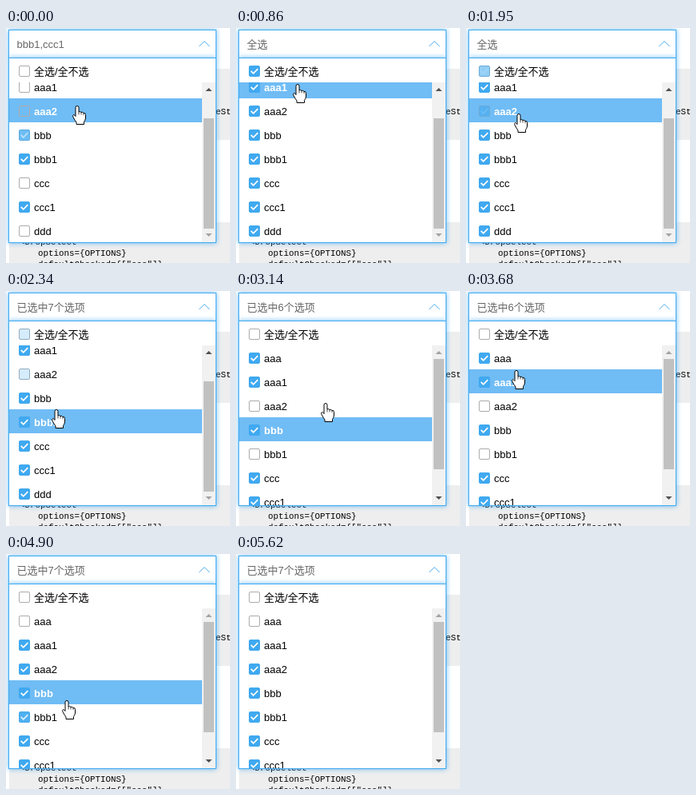
Animation of 280 by 294 pixels, one loop 5.89 s. Source, as an HTML page with a canvas:

```html
<!DOCTYPE html>
<html lang="zh-CN">
<head>
<meta charset="utf-8">
<title>Multi-select dropdown</title>
<style>
html, body { margin: 0; width: 100%; height: 100%; overflow: hidden; background: #fff; }
canvas { display: block; }
</style>
</head>
<body>
<canvas id="stage" width="280" height="294"></canvas>
<script>
const ctx = document.getElementById('stage').getContext('2d', { alpha: false });
const LOOP = 5890, BEAT = 134, LEAD = 78, FADE = 300;
const ROW = 30, LIST_TOP = 68, LIST_BOTTOM = 268, MAX_SCROLL = 40;
const BLUE = '#40a9f0', HOVER = '#70bcf5';
const SANS = '13px "Liberation Sans", "Noto Sans CJK SC", "Noto Sans CJK", sans-serif';
const MONO = '10.83px "Liberation Mono", monospace';
const ITEMS = ['aaa', 'aaa1', 'aaa2', 'bbb', 'bbb1', 'ccc', 'ccc1', 'ddd'];
const ALL = 'all';

// The pointer rests at each stop and glides between them; a click comes just before leaving.
const stop = (arrive, leave, x, y, click = false) => ({ arrive, leave, x, y, click });
const stops = [
  stop(0, 20, 89, 97),
  stop(380, 520, 78, 56, true),
  stop(590, 870, 77, 70),
  stop(990, 1300, 74, 93, true),
  stop(1530, 1830, 60, 56, true),
  stop(1930, 2170, 66, 107, true),
  stop(2330, 2510, 63, 148, true),
  stop(2860, 3390, 112, 140),
  stop(3800, 4020, 49, 87, true),
  stop(4205, 4400, 66, 141, true),
  stop(4480, 4675, 63, 193, true),
  stop(4880, 4890, 76, 183),
  stop(5140, 5150, 268, 278),
  stop(5540, LOOP, 290, 310)
];

const smooth = p => p * p * (3 - 2 * p);
const clamp = p => Math.min(1, Math.max(0, p));
const scrollAt = t => MAX_SCROLL * (1 - smooth(clamp((t - 2940) / 180)));

// While the pointer rests, the hovered row stays the one it arrived on.
function pointerAt(t) {
  const i = stops.findLastIndex(s => s.arrive <= t);
  const from = stops[i], to = stops[i + 1] || from;
  const p = t < from.leave ? 0 : smooth(clamp((t - from.leave) / (to.arrive - from.leave)));
  const x = from.x + (to.x - from.x) * p;
  const y = from.y + (to.y - from.y) * p;
  return { x, y, hover: rowUnder(x, y, scrollAt(p ? t : from.arrive)) };
}

function rowUnder(x, y, scroll) {
  if (x > 262 || y >= LIST_BOTTOM) return null;
  return y < LIST_TOP ? ALL : ITEMS[Math.floor((y - LIST_TOP + scroll) / ROW)];
}

const clicks = stops.filter(s => s.click).map(({ leave }) => {
  const time = leave - 70;
  return { time, name: pointerAt(time).hover };
});

function selectionAt(t) {
  const state = {};
  for (const name of [ALL, ...ITEMS])
    state[name] = { on: name === 'bbb1' || name === 'ccc1', since: -LOOP };
  state.bbb.since = -70;
  const set = (name, on, since) => {
    if (state[name].on !== on) state[name] = { on, since };
  };
  for (const { time, name } of clicks) {
    if (time > t) break;
    if (name === ALL) ITEMS.forEach(item => set(item, true, time));
    else set(name, !state[name].on, time);
    set(ALL, ITEMS.every(item => state[item].on), time);
  }
  for (const s of Object.values(state)) {
    const p = clamp((t - s.since) / FADE);
    s.level = s.on ? p : 1 - p;
  }
  return state;
}

function rect(x, y, w, h, color) {
  ctx.fillStyle = color;
  ctx.fillRect(x, y, w, h);
}

function text(str, x, y, color, font = SANS) {
  ctx.font = font;
  ctx.fillStyle = color;
  ctx.fillText(str, x, y);
}

function line(points, color, width) {
  ctx.beginPath();
  points.forEach(([x, y]) => ctx.lineTo(x, y));
  ctx.strokeStyle = color;
  ctx.lineWidth = width;
  ctx.stroke();
}

function triangle(x, y, dir, color) {
  ctx.beginPath();
  ctx.moveTo(x - 4, y + 2 * dir);
  ctx.lineTo(x + 4, y + 2 * dir);
  ctx.lineTo(x, y - 2 * dir);
  ctx.fillStyle = color;
  ctx.fill();
}

function glowBox(y, h) {
  ctx.save();
  ctx.shadowColor = 'rgba(64,169,240,.8)';
  ctx.shadowBlur = 6;
  rect(3, y, 260, h, '#fff');
  ctx.restore();
  ctx.strokeStyle = BLUE;
  ctx.lineWidth = 1;
  ctx.strokeRect(3.5, y + .5, 259, h - 1);
}

function drawPage() {
  rect(0, 0, 280, 294, '#fff');
  rect(4, 51, 276, 89, '#eeeeee');
  rect(4, 243, 276, 51, '#eeeeee');
  text('eState', 262, 108, '#000', MONO);
  text('<DropSelect', 17, 271, '#000', MONO);
  text('options={OPTIONS}', 40, 285, '#000', MONO);
  text('defaultChecked={["aaa"]}', 40, 299, '#000', MONO);
}

function drawCheckbox(y, { level }) {
  const mix = (a, b) => Math.round(a + (b - a) * level);
  ctx.beginPath();
  ctx.roundRect(16.5, y + .5, 13, 13, 1.5);
  ctx.fillStyle = `rgba(64,169,240,${level})`;
  ctx.fill();
  ctx.strokeStyle = `rgb(${mix(172, 64)},${mix(172, 169)},${mix(172, 240)})`;
  ctx.lineWidth = 1;
  ctx.stroke();
  const mark = Math.max(0, 2 * level - 1);
  if (mark) line([[18.7, y + 6.8], [21.7, y + 9.8], [27.3, y + 4.2]], `rgba(255,255,255,${mark})`, 1.7);
}

function drawRow(label, y, width, state, hovered) {
  if (hovered) rect(4, y, width, ROW, HOVER);
  drawCheckbox(y + 9, state);
  text(label, 35, y + 21, hovered ? '#fff' : '#000', hovered ? 'bold ' + SANS : SANS);
}

function drawScrollbar(scroll) {
  rect(245, LIST_TOP, 17, 200, '#f1f1f1');
  rect(247, 85 + scroll * 0.7, 13, 138, '#c1c1c1');
  triangle(253.5, 77, 1, scroll > 0 ? '#505050' : '#a3a3a3');
  triangle(253.5, 259, -1, scroll < MAX_SCROLL ? '#505050' : '#a3a3a3');
}

function summary(state) {
  const chosen = ITEMS.filter(item => state[item].on);
  if (chosen.length === ITEMS.length) return '全选';
  return chosen.length < 3 ? chosen.join(',') : `已选中${chosen.length}个选项`;
}

const hand = new Path2D(`M-2 13V2.5Q-2 .5 0 .5T2 2.5V8Q3.5 6.8 5 8.5Q6.5 7.6 8 9.5
  Q10.5 9 10.5 11.5V16Q10 18.5 8.5 20.5V23.5H-1V21Q-3 18.5-5 14.5Q-6 12-4.5 11.5Q-3.5 11.5-2 13.5Z`);
const knuckles = new Path2D('M2 8V11.5M5 8.5V11.5M8 9.5V12');

function drawPointer({ x, y, hover }) {
  ctx.save();
  ctx.translate(Math.round(x), Math.round(y));
  ctx.strokeStyle = '#000';
  ctx.lineWidth = 1;
  if (hover) {
    ctx.fillStyle = '#fff';
    ctx.fill(hand);
    ctx.stroke(hand);
    ctx.lineWidth = .7;
    ctx.stroke(knuckles);
  } else {
    rect(-3, 0, 6, 1, '#000');
    rect(-.5, 1, 1, 15, '#000');
    rect(-3, 16, 6, 1, '#000');
  }
  ctx.restore();
}

function draw(time) {
  const t = Math.max(0, Math.floor((time + LEAD) / BEAT) * BEAT - LEAD);
  const pointer = pointerAt(t);
  const state = selectionAt(t);
  const scroll = scrollAt(t);

  drawPage();
  glowBox(2, 36);
  glowBox(37, 232);
  text(summary(state), 13.5, 25, '#666');
  line([[241.5, 23], [248, 16.5], [254.5, 23]], BLUE, 1);
  drawRow('全选/全不选', 38, 258, state[ALL], pointer.hover === ALL);

  ctx.save();
  ctx.beginPath();
  ctx.rect(4, LIST_TOP, 258, LIST_BOTTOM - LIST_TOP);
  ctx.clip();
  ITEMS.forEach((item, i) =>
    drawRow(item, LIST_TOP + i * ROW - scroll, 241, state[item], pointer.hover === item));
  drawScrollbar(scroll);
  ctx.restore();

  drawPointer(pointer);
}

const start = performance.now();
function tick() {
  draw((performance.now() - start) % LOOP);
  requestAnimationFrame(tick);
}
tick();
</script>
</body>
</html>
```
